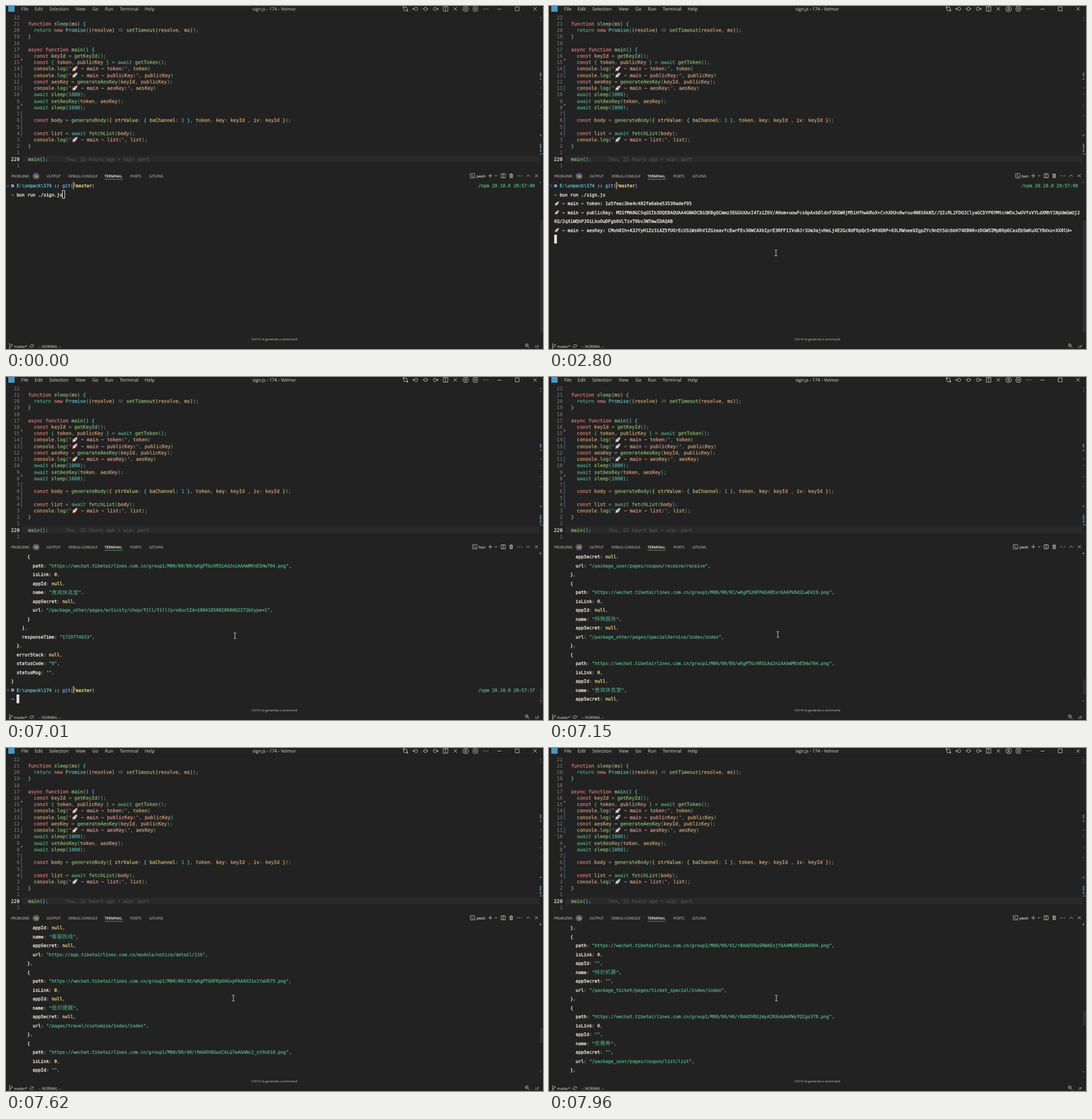
Write an HTML page with a canvas that moves like this. It is 937 px wide and 598 px high and loops after 8000 ms.

```html
<!DOCTYPE html>
<html lang="en">
<head>
<meta charset="utf-8">
<title>Editor and terminal</title>
<style>
html, body { margin: 0; width: 100%; height: 100%; overflow: hidden; background: #222; }
canvas { display: block; width: 937px; height: 598px; }
</style>
</head>
<body>
<canvas id="stage" width="937" height="598"></canvas>
<script>
const ctx = document.getElementById('stage').getContext('2d');
const LOOP = 8000;
const MONO = '"DejaVu Sans Mono", monospace';
const SANS = '"Open Sans", "Noto Sans", sans-serif';
const CJK = '"Noto Sans CJK SC", "Noto Sans CJK", sans-serif';
const C = {
  bg: '#222222', fg: '#e6e2d6', ui: '#c6c1b2', dim: '#8c897f', punct: '#7c7c7c',
  red: '#d97a74', green: '#4fa07d', fn: '#8ab56c', vari: '#cfa072', prop: '#c6b96f',
  str: '#d89888', quote: '#92695f', type: '#5fb3b1', num: '#50a49b',
  cyan: '#60b6c1', blue: '#6a9fcc', yellow: '#ecd07a', orange: '#dc9e74'
};
// col: column width, emoji: width of an emoji, ink: extra glyph weight
const ED = { x: 38.5, y: 19.6, step: 11.23, col: 5.045, emoji: 11.7, ink: 0.25 };
const TM = { x: 9, y: 313.5, step: 15.48, col: 4.703, emoji: 9.406, ink: 0.38, rows: 17 };

function rect(x, y, w, h, color) {
  ctx.fillStyle = color;
  ctx.fillRect(x, y, w, h);
}

function line(d, color, x = 0, y = 0, width = 0.9) {
  ctx.save();
  ctx.translate(x, y);
  ctx.strokeStyle = color;
  ctx.lineWidth = width;
  ctx.stroke(new Path2D(d));
  ctx.restore();
}

function glyphs(s, x, y, color, ink) {
  ctx.fillStyle = ctx.strokeStyle = color;
  ctx.lineWidth = ink;
  ctx.fillText(s, x, y);
  ctx.strokeText(s, x, y);
}

function label(s, x, cy, size, color, align = 'left', weight = 400) {
  ctx.font = `${weight} ${size}px ${SANS}`;
  ctx.textAlign = align;
  glyphs(s, x, cy + size * 0.36, color, 0.12);
}

function rocket(x, cy, size) {
  ctx.save();
  ctx.translate(x + size / 2, cy);
  ctx.rotate(Math.PI / 4);
  ctx.scale(size / 10.5, size / 10.5);
  const part = (d, color) => { ctx.fillStyle = color; ctx.fill(new Path2D(d)); };
  part('M-1.2 3L0 6L1.2 3Z', '#f0a33c');
  part('M-1.5 0L-3.4 3.5L0 2.6L3.4 3.5L1.5 0Z', '#d5504a');
  part('M0-6C2.6-3 2.4 1 1.3 3L-1.3 3C-2.4 1-2.6-3 0-6Z', '#d8dce0');
  part('M0-6L1.3-3.8L-1.3-3.8Z', '#d5504a');
  part('M-.9-2h1.8v1.8h-1.8Z', '#4a83a8');
  ctx.restore();
}

// Draws on a column grid and returns the x after the last column.
function mono(s, x, cy, grid, color) {
  const { col, emoji, ink } = grid;
  const size = col / 0.602;
  ctx.textAlign = 'left';
  for (const ch of s) {
    if (ch === '🚀') {
      rocket(x, cy, emoji);
      x += emoji;
    } else if (ch === '⇒') {
      line('M1-1.3H7.5M1 1.3H7.5M6-3L9 0L6 3', color, x, cy, 0.8);
      x += col * 2;
    } else {
      const wide = ch > '\u2e80';
      if (ch !== ' ') {
        ctx.font = wide ? `${col * 1.95}px ${CJK}` : `${size}px ${MONO}`;
        glyphs(ch, x, cy + size * (wide ? 0.42 : 0.36), color, wide ? 0.1 : ink);
      }
      x += wide ? col * 2 : col;
    }
  }
  return x;
}

// ---------- editor ----------
const code = `
function sleep(ms) {
  return new Promise((resolve) ⇒ setTimeout(resolve, ms));
}

async function main() {
  const keyId = getKeyId();
  const { token, publicKey } = await getToken();
  console.log("🚀 ~ main ~ token:", token)
  console.log("🚀 ~ main ~ publicKey:", publicKey)
  const aesKey = generateAesKey(keyId, publicKey);
  console.log("🚀 ~ main ~ aesKey:", aesKey)
  await sleep(1000);
  await setAesKey(token, aesKey);
  await sleep(1000);

  const body = generateBody({ strValue: { baChannel: 1 }, token, key: keyId , iv: keyId });

  const list = await fetchList(body);
  console.log("🚀 ~ main ~ list:", list);
}

main();
`.split('\n');

function wordColor(word, next) {
  if (/^(function|const|async|new)$/.test(word)) return C.red;
  if (/^(return|await)$/.test(word)) return C.green;
  if (word === 'Promise') return C.type;
  if (/^\d/.test(word)) return C.num;
  if (next === '(') return C.fn;
  return next === ':' ? C.prop : C.vari;
}

function drawEditor() {
  const levels = [C.cyan, C.green, C.orange];
  let depth = 0;
  rect(29, 261, 902, 11.3, '#292929');
  code.forEach((text, i) => {
    const cy = ED.y + i * ED.step;
    const no = i === 22 ? '220' : String(i < 22 ? 22 - i : 1);
    mono(no, 23.7 - no.length * ED.col, cy, ED, i === 22 ? C.fg : '#6b6a66');
    let x = ED.x;
    for (const m of text.matchAll(/"[^"]*"|\w+|\s+|./gu)) {
      const tok = m[0];
      const put = (s, color) => { x = mono(s, x, cy, ED, color); };
      if (tok[0] === '"') {
        put('"', C.quote);
        put(tok.slice(1, -1), C.str);
        put('"', C.quote);
      } else if (/\w/.test(tok)) put(tok, wordColor(tok, text[m.index + tok.length]));
      else if (/[({]/.test(tok)) put(tok, levels[depth++ % 3]);
      else if (/[)}]/.test(tok)) put(tok, levels[--depth % 3]);
      else put(tok, C.punct);
    }
  });
  mono('You, 22 hours ago • wip: part', ED.x + 13 * ED.col, ED.y + 22 * ED.step, ED, '#505050');
  for (const [y, h] of [[104, 22], [138, 11], [183, 45]]) rect(26.5, y, 1, h, '#4a7089');
  ctx.fillStyle = C.red;
  for (const y of [93.5, 172]) ctx.fill(new Path2D(`M26.5 ${y - 1.7}L29 ${y}L26.5 ${y + 1.7}Z`));
  for (const y of [19, 24, 142, 153, 173, 190]) rect(932, y, 2, 2, '#555');
  for (const [y, h] of [[116, 7], [126, 3], [224, 3], [240, 9], [250, 5]]) rect(931.5, y, 2.5, h, '#4a7089');
  rect(931, 257.5, 6, 1, '#888');
}

// ---------- window frame ----------
function drawTitle(active) {
  const ink = active ? C.ui : '#b3afa2';
  rect(4, 0, 11, 10, '#4599c4');
  const menu = { File: 26.5, Edit: 50, Selection: 75.5, View: 121.5, Go: 150.5, Run: 172.5, Terminal: 198.5, Help: 242 };
  for (const name in menu) label(name, menu[name], 5, 8, ink);
  label('sign.js - 174 - Velmor', 468, 5, 7.9, ink, 'center');
  const ring = 'M-2.8 0a2.8 2.8 0 1 0 5.6 0a2.8 2.8 0 1 0-5.6 0';
  const cross = 'M-3-3L3 3M3-3L-3 3';
  const icons = [
    [697, 'M-3-2.5V2Q-3 3 0 3M3 3V-1Q3-3 0-3M-4-4h2v2h-2ZM2 2h2v2h-2ZM1-4L0-3L1-2M-1 2L0 3L-1 4'],
    [715.5, ring + 'M-3 0H-6M-4-2L-6 0L-4 2'],
    [732, ring + 'M-3 0H-5M3 0H5'],
    [748.5, ring + 'M3 0H6M4-2L6 0L4 2'],
    [767, 'M-4-4H4V4H-4ZM0-4V4'],
    [784, cross],
    [802, 'M-4.8 0a4.8 4.8 0 1 0 9.6 0a4.8 4.8 0 1 0-9.6 0M-1.7-1a1.7 1.7 0 1 0 3.4 0a1.7 1.7 0 1 0-3.4 0M-3 3.6Q0-.4 3 3.6'],
    [819, 'M-1.6 0a1.6 1.6 0 1 0 3.2 0a1.6 1.6 0 1 0-3.2 0M-1-4.7H1L1.5-3.4L3-4L4.2-2.4L3.4-1L4.8 0L3.4 1.2L4 3L2.6 4L1.5 3.4L1 4.7H-1L-1.5 3.4L-3 4L-4.2 2.4L-3.4 1L-4.8 0L-3.4-1.2L-4-3L-2.6-4L-1.5-3.4Z'],
    [861, 'M-3.5 .5H3.5'],
    [892, 'M-3.3-3.3H3.3V3.3H-3.3Z'],
    [923, cross]
  ];
  for (const [x, d] of icons) line(d, ink, x, 5);
  for (const dx of [-4, -0.5, 3]) rect(837 + dx, 4.5, 1.3, 1.3, ink);
}

function drawPanelBar(shell) {
  const cy = 296.5;
  const tabs = { PROBLEMS: 9, OUTPUT: 71, 'DEBUG CONSOLE': 109, TERMINAL: 172, PORTS: 217, GITLENS: 250 };
  for (const name in tabs) {
    const on = name === 'TERMINAL';
    label(name, tabs[name], cy, 6.2, on ? C.fg : '#b8b4a8', 'left', on ? 600 : 400);
  }
  rect(172, 301.6, 32, 1, C.green);
  ctx.fillStyle = '#5c5b58';
  ctx.beginPath();
  ctx.roundRect(46.5, 291, 12, 11, 5.5);
  ctx.fill();
  label('16', 52.5, cy, 5.6, C.fg, 'center');
  const left = shell === 'bun' ? 818 : 814;
  line('M-3.8-3.8H3.8V3.8H-3.8ZM-2-2L0 0L-2 2M0 2H2.4', C.ui, left, 296, 0.8);
  label(shell, left + 7, cy, 6.3, C.fg);
  const icons = [
    [845, 'M-3.6 0H3.6M0-3.6V3.6'],
    [855, 'M-2-1L0 1L2-1'],
    [867.5, 'M-3.5-3.5H3.5V3.5H-3.5ZM0-3.5V3.5'],
    [881.5, 'M-3-2.5H3M-1-3.5H1M-2.2-2.5V3.5H2.2V-2.5M-.7-1.5V2.5M.7-1.5V2.5'],
    [911, 'M-3 1.5L0-1.5L3 1.5'],
    [925.5, 'M-2.5-2.5L2.5 2.5M2.5-2.5L-2.5 2.5']
  ];
  for (const [x, d] of icons) line(d, C.ui, x, 296);
  for (const dx of [-4, -0.5, 3]) rect(896 + dx, 295.5, 1.3, 1.3, C.ui);
}

const branch = 'M-2-2V2M-3-3.5a1 1 0 1 0 2 0a1 1 0 1 0-2 0M-3 3a1 1 0 1 0 2 0a1 1 0 1 0-2 0M1-2a1 1 0 1 0 2 0a1 1 0 1 0-2 0M2-1Q2 1-2 1';

function drawStatus() {
  label('Ctrl+K to generate a command', 468, 581, 5.6, '#a09d93', 'center');
  line(branch, C.ui, 8.5, 593, 0.8);
  label('master*', 14, 593.5, 6.1, C.ui);
  line('M-2.8-.5A3 3 0 0 1 2.8-.5M2.8 .8A3 3 0 0 1-2.8 .8M4-2L2.8-.2L1.2-1.5M-4 2L-2.8 .4L-1.2 1.7', C.ui, 45, 592.8, 0.8);
  label('-- NORMAL --', 56.5, 593.5, 6.6, C.ui);
  line('M-3.3-1a2.5 2.5 0 1 0 5 0a2.5 2.5 0 1 0-5 0M1 1L3.8 3.8M-2-1H.5', C.ui, 909.5, 592.5);
  label('LF', 923.5, 593.5, 6.4, C.ui);
}

// ---------- terminal ----------
const entry = (name, file, value, url, comma = ',') => [
  '      {',
  `        path: "https://wechat.tibetairlines.com.cn/group1/M00/00/${file}.png",`,
  '        isLink: 0,',
  `        appId: ${value},`,
  `        name: "${name}",`,
  `        appSecret: ${value},`,
  `        url: "${url}",`,
  '      }' + comma
];
const none = 'null', empty = '""';
const output = [
  '      },',
  ...entry('特价机票', '41/rBAAOV8aSRWAEsjYAAAMU8RIbB4984', empty, '/package_ticket/pages/ticket_special/index/index'),
  ...entry('优惠券', '40/rBAAOV8GjmyAIK6nAAAPWyYQIgs378', empty, '/package_user/pages/coupon/list/list'),
  ...entry('客服热线', '3E/wKgPTGHFRhWAK2uYAAAMd4n7TcQ582', none, 'https://app.tibetairlines.com.cn/module/notice/detail/116'),
  ...entry('低价提醒', '3E/wKgPTGHFRpOAGvpPAAAOJ1o1YeU075', none, '/pages/travel/customize/index/index'),
  ...entry('非自愿改期', '40/rBAAOV8GwzCALG7eAAANc2_xtOs618', empty, '/pages/order/upgrade/unusual/unusual'),
  ...entry('领券中心', '8C/wKgPS2HFPjCAN9UwAAAQ3an36vQ106', none, '/package_user/pages/coupon/receive/receive'),
  ...entry('特殊服务', '8C/wKgPS2HFPmSAB5xrAAAPk8d2LwE419', none, '/package_other/pages/specialService/index/index'),
  ...entry('贵宾休息室', 'B9/wKgPTGcHR5iAdJniAAAmMKnE5Hw704', none,
    '/package_other/pages/activity/shop/fill/fill?productId=1004185882868662272&type=1', ''),
  '    ],',
  '    responseTime: "1729774633",',
  '  },',
  '  errorStack: null,',
  '  statusCode: "0",',
  '  statusMsg: "",',
  '}'
];
const logs = [
  '🚀 ~ main ~ token: 1a5feac3be4c482fa6abe53539adef95',
  '🚀 ~ main ~ publicKey: MIGfMA0GCSqGSIb3DQEBAQUAA4GNADCBiQKBgQCmmz3EGGhXAxI4TziZ6V/AHom+uowFcs6pAxbDldxF3XGW8jM5iHfhwkRoX+CvhXH3v0wruu4N016kN5//QIcRL2FDOJClyaGCDYP6YMtcnWOxJwUVfsVYLdXMhY1NpUmGmUj2',
  '6Q/2qXiWQhPJOiLkoOuDFgb6VLTzxT9bv3NTmwIDAQAB',
  '🚀 ~ main ~ aesKey: CMoh0Ih+A3JYyH1Zz3iAZ5fUOrEcUSiWs0hV1ZGzeavfcEwrFEv36WCAXkIprE3RFF1IVoBJr1Um3ajvHeLj4E2Gc8dF6pQc5+NfdQ0P+63LRWxee9ZgpZYc9nQtSdcbbH74DB08+zDGWSIMpB9p6CasEbSmKuXCY8dxu+XX8lU='
];

const rowY = r => TM.y + r * TM.step;
const colX = c => TM.x + c * TM.col;
const term = (s, c, r, color) => mono(s, colX(c), rowY(r), TM, color);

function drawJson(text, r) {
  let x = TM.x;
  for (const [tok] of text.matchAll(/"[^"]*"|\w+|\s+|./gu)) {
    const color = tok[0] === '"' ? C.green
      : /^(null|\d+)$/.test(tok) ? C.yellow
      : /[:,]/.test(tok) ? C.dim : C.fg;
    x = mono(tok, x, rowY(r), TM, color);
  }
}

function drawPrompt(r, time) {
  const y = rowY(r);
  line('M-1.7 0a1.7 1.7 0 1 0 3.4 0a1.7 1.7 0 1 0-3.4 0', '#666', 3.5, y, 0.8);
  rect(9, y - 2.5, 5, 5, C.blue);
  term('E:\\unpack\\174', 2, r, C.cyan);
  term('::', 16, r, C.fg);
  term('git(', 19, r, C.blue);
  line('M-1.2-6V6M-1.2 2Q1.7 1 1.7-4M-2.2-5L-1.2-6.5L0-5', C.yellow, colX(23) + 1.8, y, 1);
  term('master', 24, r, C.yellow);
  term(')', 30, r, C.blue);
  mono('/npm 20.10.0 ' + time, 824.3, y, TM, C.green);
  term('→', 0, r + 1, C.green);
}

function drawCaret(c, r, solid = true) {
  const x = colX(c), y = rowY(r) - 7.6;
  if (solid) rect(x, y, 4.8, 15.2, C.fg);
  else {
    ctx.strokeStyle = C.fg;
    ctx.lineWidth = 1;
    ctx.strokeRect(Math.round(x) + 0.5, Math.round(y) + 0.5, 4, 14);
  }
}

const drawThumb = (y, h) => rect(931.5, y, 5.5, h, '#2f2f2f');

function drawSession(t, active) {
  drawThumb(374, 195);
  drawPrompt(0, '20:57:00');
  term('bun run ./sign.js', 2, 1, C.fg);
  if (t < 1740) drawCaret(19, 1, active);
  else if (t < 2800) drawCaret(0, 2);
  else {
    logs.forEach((s, i) => term(s, 0, i + 2, C.fg));
    drawCaret(0, 6);
  }
}

// Wheel scrolling: [time, first visible line]
const scroll = [[6320, 55], [6390, 57], [7080, 50], [7150, 46], [7280, 38], [7420, 31], [7490, 26],
  [7620, 20], [7690, 16], [7760, 11], [7820, 7], [7890, 2], [7960, 0]];

function drawOutput(t) {
  const top = scroll.findLast(s => s[0] <= t)[1];
  for (let r = 0; r < TM.rows; r++) {
    if (output[top + r]) drawJson(output[top + r], r);
  }
  if (t < 6390) drawCaret(1, 16);
  else if (top === 57) {
    drawPrompt(15, '20:57:17');
    drawCaret(2, 16);
  }
  drawThumb(458 + 1.5 * top, 26);
  if (t >= 6390) rect(931.5, 563.5, 2, 2, '#666');
}

// ---------- pointer ----------
const path = [[320, 430, 596], [680, 396, 430.5], [6390, 396, 430.5], [7010, 399.5, 451], [7080, 399.5, 451],
  [7420, 398.5, 441], [7490, 398.5, 441], [7620, 396.7, 436], [LOOP, 396.7, 436]];

function drawPointer(t) {
  if (t < path[0][0]) return;
  const i = path.findIndex(p => p[0] > t);
  const a = path[i - 1], b = path[i];
  const k = (t - a[0]) / (b[0] - a[0]);
  line('M-2.3-5H-.5L0-4.5L.5-5H2.3M0-4.5V4.5M-2.3 5H-.5L0 4.5L.5 5H2.3', '#dcdcdc',
    a[1] + (b[1] - a[1]) * k, a[2] + (b[2] - a[2]) * k, 0.9);
}

function draw(t) {
  const active = t >= 530;
  ctx.textRendering = 'geometricPrecision';
  ctx.textBaseline = 'alphabetic';
  ctx.lineJoin = 'round';
  rect(0, 0, 937, 598, C.bg);
  rect(0, 13.5, 937, 0.6, '#191919');
  drawEditor();
  drawTitle(active);
  drawPanelBar(t >= 2530 && t < 7150 ? 'bun' : 'pwsh');
  if (t < 6320) drawSession(t, active);
  else drawOutput(t);
  rect(931.5, 306, 2, 3, t < 6390 ? '#555' : C.blue);
  drawStatus();
  drawPointer(t);
}

const start = performance.now();
function tick() {
  draw((performance.now() - start) % LOOP);
  requestAnimationFrame(tick);
}
tick();
</script>
</body>
</html>
```
